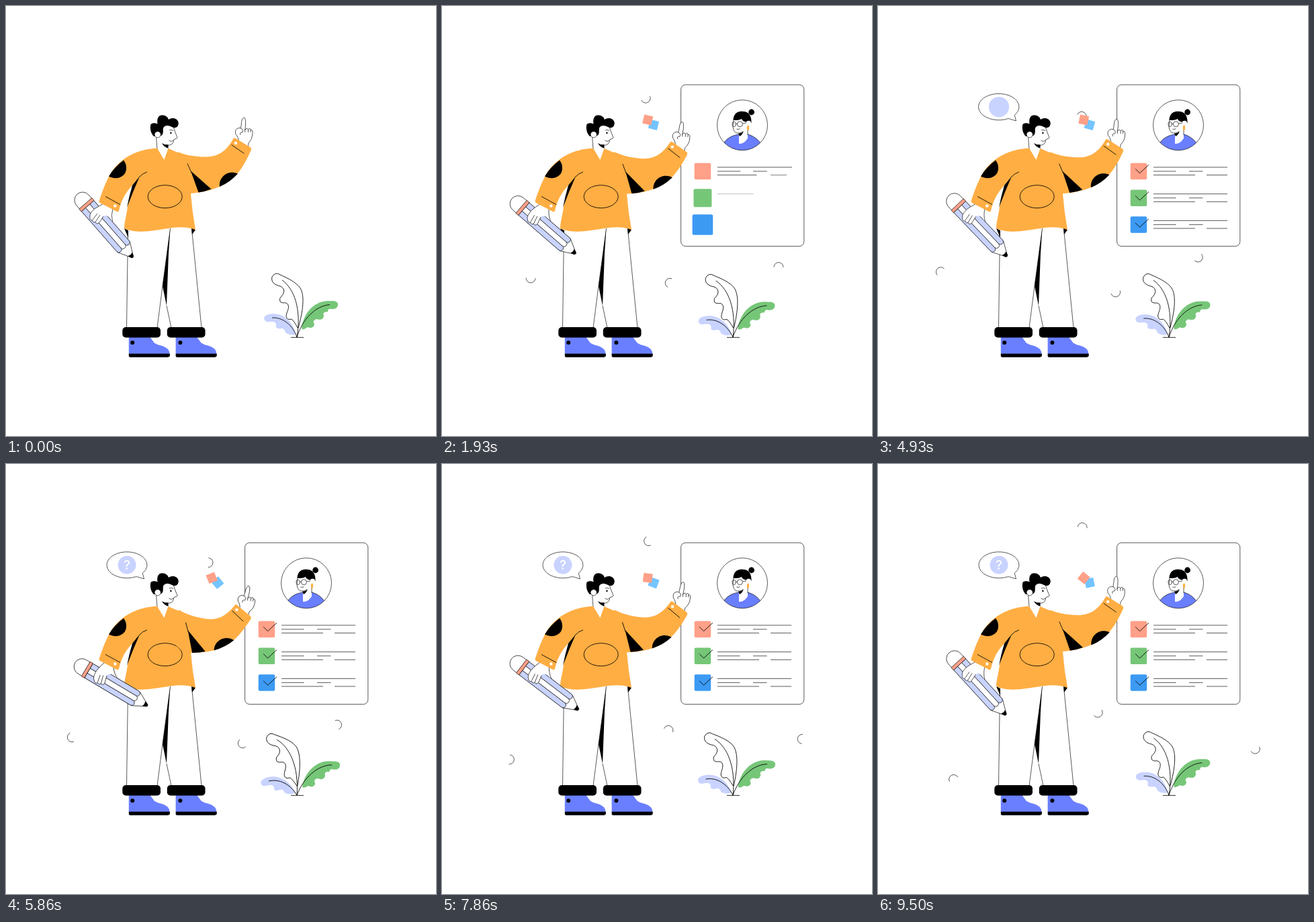
Recreate the animation shown at these times as an HTML page with a canvas. Size 640 by 640 pixels, loop 9.57 s.

```html
<!DOCTYPE html>
<html lang="en">
<head>
<meta charset="utf-8">
<title>Profile checklist</title>
<style>
  html, body { margin: 0; width: 100%; height: 100%; overflow: hidden; background: #fff; }
  canvas { display: block; width: 640px; height: 640px; }
</style>
</head>
<body>
<canvas id="stage" width="640" height="640"></canvas>
<script>
const ctx = document.getElementById('stage').getContext('2d');
const LOOP = 9570, HALF = LOOP / 2, STEP = LOOP / 134, SWAY = LOOP / 4;
const THIN = 0.65, BOLD = 0.85;
const INK = '#000', WHITE = '#fff', AMBER = '#ffae43', INDIGO = '#6a7fff', LILAC = '#c9d3ff',
  SALMON = '#ffa088', GREEN = '#76c678', BLUE = '#3d9af3', SKY = '#74c4ff';

const clamp = v => Math.max(0, Math.min(1, v));
const mix = (a, b, k) => a + (b - a) * k;
const rad = deg => deg * Math.PI / 180;

// Grows from 0 to 1 with an overshoot set by pull.
function pop(t, start, span, pull) {
  if (t <= start) return 0;
  const v = clamp((t - start) / span) - 1;
  return 1 + (pull + 1) * v ** 3 + pull * v * v;
}

// Linear interpolation through [time, value] keys.
function keyed(t, keys) {
  let i = 1;
  while (i < keys.length - 1 && t > keys[i][0]) i++;
  const [t0, a] = keys[i - 1], [t1, b] = keys[i];
  return mix(a, b, (t - t0) / (t1 - t0));
}

function paint(path, fill, stroke, width = THIN) {
  const p = typeof path === 'string' ? new Path2D(path) : path;
  if (fill) { ctx.fillStyle = fill; ctx.fill(p); }
  if (stroke) { ctx.strokeStyle = stroke; ctx.lineWidth = width; ctx.stroke(p); }
}
const fill = (path, color) => paint(path, color);
const line = (path, width) => paint(path, null, INK, width);

function oval(x, y, rx, ry, color, stroke, width) {
  const p = new Path2D();
  p.ellipse(x, y, rx, ry, 0, 0, Math.PI * 2);
  paint(p, color, stroke, width);
}
const disc = (x, y, r, color, stroke, width) => oval(x, y, r, r, color, stroke, width);

function box(x, y, w, h, r, color, stroke, width) {
  const p = new Path2D();
  p.roundRect(x, y, w, h, r);
  paint(p, color, stroke, width);
}

// Runs draw() rotated and scaled around a pivot.
function around(x, y, deg, scale, draw) {
  if (scale <= 0) return;
  ctx.save();
  ctx.translate(x, y);
  ctx.rotate(rad(deg));
  ctx.scale(scale, scale);
  ctx.translate(-x, -y);
  draw();
  ctx.restore();
}

// Drifting half rings: start, turning point and end of the path, first angle, spin direction.
const rings = [
  { path: [[304.5, 125], [304.5, 163.3], [304.5, 90]], angle: 102, spin: 1 },
  { path: [[154, 428], [90.4, 391], [111.3, 467.5]], bend: [114.8, 393.2], angle: 57, spin: -1 },
  { path: [[323, 397], [355.5, 431], [328.7, 372]], angle: -119, spin: 1 },
  { path: [[518, 392], [476, 375], [564.3, 428]], angle: 237, spin: -1 }
];

function drawRing(t, { path, bend, angle, spin }) {
  const at = axis => {
    const keys = [[0, path[0][axis]], [HALF, path[1][axis]], [LOOP, path[2][axis]]];
    if (bend) keys.splice(1, 0, [3430, bend[axis]]);
    return keyed(t, keys);
  };
  const gap = rad(angle + spin * 720 * t / LOOP);
  const x = at(0), y = at(1);
  around(x, y, 0, pop(t, 400, 600, 1), () => {
    const p = new Path2D();
    p.arc(x + 3.5 * Math.cos(gap), y + 3.5 * Math.sin(gap), 7, gap + Math.PI / 2, gap + Math.PI * 1.5);
    line(p);
  });
}

function drawTiles(t) {
  const size = pop(t, 400, 600, 1);
  const turn = keyed(t, [[0, -102], [1930, 14], [4930, 192], [6790, 304], [7860, 368], [LOOP, 495]]);
  around(315, 176.8, 28 - turn, size, () => fill('M308.3 170.1h13.4v13.4h-13.4z', SKY));
  around(306.2, 169.5, turn, size, () => fill('M299.5 162.8h13.4v13.4h-13.4z', SALMON));
}

function drawAvatar() {
  disc(447, 177.3, 37.5, WHITE);
  ctx.save();
  const frame = new Path2D();
  frame.arc(447, 177.3, 37.5, 0, Math.PI * 2);
  ctx.clip(frame);
  paint('M416 210C422 196 433 192 443 191L455 191C466 194 473 201 478 210L470 220H424Z', INDIGO, INK);
  fill('M442 187V205Q449 206 455 197V182Z', WHITE);
  ctx.restore();
  disc(447, 177.3, 37.5, null, INK);
  fill('M434 168L433 180Q434 187 438 189Q446 190 449 186L456 178V166Z', WHITE);
  line('M434 168L433 180Q434 187 438 189Q444 190 448 187M455 179V192');
  fill('M441 189.5Q446 190 449 186Q447 192 443 194Z', INK);
  disc(460.6, 158, 4.4, INK);
  fill('M433.5 169.5C434 159 442 156 448 157C457 157 461 164 460.5 174Q456 179 454 173Q447 172 446 168Q441 171 433.5 169.5Z', INK);
  disc(456.3, 174.5, 3.8, WHITE);
  oval(455.5, 181.3, 1.6, 3.9, AMBER);
  oval(434.6, 176, 2.7, 3.7, null, INK);
  disc(443.4, 175.8, 4, null, INK);
  line('M437.3 175.5H439.4M447.4 175L453 174M438.5 183Q441 184.5 443.5 182.5');
}

const segments = [[410, 520, 0], [410, 443.5, 6], [463, 483.5, 6], [410, 472, 11.6], [489, 520, 11.6]];

function drawRow(t, row, color) {
  const dy = row * 39.7;
  around(388, 246 + dy, 0, pop(t, 1180 + row * 200, 700, 3), () => box(375.7, 233.8 + dy, 24.5, 24.5, 2, color));
  segments.forEach(([x0, x1, drop], i) => {
    const start = 1140 + row * 650 + i * 130;
    const grow = pop(t, start, 900, 0.85);
    if (!grow) return;
    ctx.globalAlpha = clamp((t - start) / 350);
    const y = 240 + dy + drop;
    line(`M${x0} ${y}H${x0 + (x1 - x0) * grow}`);
    ctx.globalAlpha = 1;
  });
  const length = 28.2 * clamp((t - 2600 - row * 440) / 330);
  if (length) {
    const y = 242.3 + row * 40.2;
    ctx.setLineDash([length, 60]);
    line(`M383 ${y}L389.5 ${y + 6.5}L403 ${y - 6}`, BOLD);
    ctx.setLineDash([]);
  }
}

function drawCard(t) {
  around(447.2, 237.3, 0, pop(t, 250, 900, 1.45), () => box(355.6, 117.2, 183.2, 240.4, 7, WHITE, INK));
  around(447, 177.3, 0, pop(t, 700, 700, 1.5), drawAvatar);
  [SALMON, GREEN, BLUE].forEach((color, row) => drawRow(t, row, color));
}

function drawBubble(t) {
  around(205.5, 171, 0, pop(t, 4265, 700, 3), () => {
    const p = new Path2D();
    p.ellipse(180, 150.3, 30, 19.5, 0, rad(62), rad(399));
    p.lineTo(205.5, 171);
    p.closePath();
    paint(p, WHITE, INK);
  });
  around(180, 150.3, 0, pop(t, 4400, 700, 3), () => disc(180, 150.3, 13.5, LILAC));
  around(180, 150.3, 0, pop(t, 4920, 700, 3), () => {
    ctx.fillStyle = WHITE;
    ctx.font = '500 19px Inter, sans-serif';
    ctx.textAlign = 'center';
    ctx.fillText('?', 180, 157.3);
  });
}

function drawPlant(sway) {
  const leaf = (deg, draw) => around(433, 493, deg * sway, 1, draw);
  leaf(-13, () => {
    fill('M431 489C429 473 415 458 398 458Q386 458 384 464Q384 471 393 470Q402 469 402 475Q400 481 409 480Q415 479 416 486Q423 491 431 489Z', LILAC);
    line('M396 464C412 463 427 475 433 493', BOLD);
  });
  leaf(4.3, () => {
    fill('M440 480C442 459 457 440 478 439L488 439Q495 440 494 446Q492 452 484 451Q479 450 479 455Q470 455 473 461Q472 469 462 466Q455 468 459 474Q457 481 449 478Q442 483 440 480Z', GREEN);
    line('M482 444.5C461 446 441 466 433 493', BOLD);
  });
  leaf(-5.9, () => {
    paint('M434 479Q429 469 425 466Q418 468 417 462C417 456 422 451 420 445C417 439 412 444 408 440Q406 435 410 432C416 426 414 419 408 417C400 415 394 411 396 403Q401 395 408 400C419 405 432 411 438 420C445 431 442 455 435 479Z', WHITE, INK, BOLD);
    line('M411 408C429 421 440 451 433 493', BOLD);
  });
  line('M424 493.3H443', BOLD);
}

function drawShoe(x) {
  ctx.save();
  ctx.translate(x, 0);
  fill('M0 492H31L38 501.5Q43 505 50 506Q60 509 61 518H0Z', INDIGO);
  fill('M0 517.5H61Q62 522.7 58 522.7H2Q0 522.7 0 521Z', INK);
  ctx.restore();
}

function drawLegs() {
  fill('M182 332L179.5 479H225L239 440L246 479H291L277 332Z', WHITE);
  line('M181.5 335L179.5 479M276.5 332L291 479M233 417L225 479M239 446L246 479M244.5 331L233 417');
  fill('M244.5 331L233 417L239 446L242 368Z', INK);
  fill('M176 331L182 334V345Z', INK);
  fill('M276 330L282 333L277 340Z', INK);
  drawShoe(182.8);
  drawShoe(252.6);
  disc(188.2, 501, 3, INK);
  disc(259.4, 501, 3, INK);
  box(173.3, 478, 56.7, 15.5, 5, INK);
  box(239.8, 478, 56.7, 15.5, 5, INK);
}

function drawHead() {
  fill('M223.5 190L225 213L235 229L241 212V206L246 207Q250 204 250 198Q255 197 255 196L251 187L250 180L236 176Z', WHITE);
  line('M223.5 194L225 213M241 206V212M238 207Q249 209 250 198.5Q255 197.5 255 195.8L251.5 187L249.5 181');
  fill('M232 204Q236 207 241.3 206.5V211.5Q235 210 232 204Z', INK);
  fill('M220 194C215 189 214 181 215.5 176Q219 173 225.5 175.5C224 166 228 162 233 162.5Q240 163 242 169C247 165 256 167 256.7 174C257 180 252 183 247 180Q239 176 235 180C232 184 236 190 231 193Z', INK);
  disc(225.7, 191.3, 4.6, WHITE, INK);
  oval(245.4, 189, 1.1, 1.4, INK);
  line('M243 185Q246 183.5 249 185.5M242.5 200Q246 203 249 200');
}

function drawTorso() {
  fill('M221 212L225 212L235.3 229L241.5 212Q252 217 262 220L272 238L275 279Q277 306 282 333C268 328 254 329 242 331C220 334 196 340 176 331C176 320 180 311 181 298L190 264Z', AMBER);
  oval(236.7, 283.7, 25.5, 17, null, INK, BOLD);
}

function drawPencil() {
  ctx.save();
  ctx.translate(114, 289);
  ctx.rotate(rad(48.7));
  paint('M0 -12A12 12 0 0 0 0 12H93L113.5 1V-1L93 -12Z', WHITE, INK);
  const bands = [[-12.2, LILAC], [4, LILAC], [-4.1, WHITE]];
  for (const [y, color] of bands) box(11.5, y, 83.5, 8.2, [0, 4, 4, 0], color, INK);
  box(6.5, -12.6, 5, 25.2, 0.5, SALMON, INK);
  fill('M107 -4L112 -2.5Q115 0 112 2.5L107 4Q109 0 107 -4Z', INK);
  ctx.restore();
  fill('M148 292Q139 297 133 301C128 305 124 310 125 314Q124 319 129 319Q129 323 133 321.5Q135 326 139 322L145 313Q152 309 158 321Q156 312 159 301Z', WHITE);
  line('M148 293Q139 297 133 301C128 305 124 310 125 314Q124 319 129 319Q129 323 133 321.5Q135 326 139 322L145 313M129 318L136 309M133 321.5L140 311M159 301Q156 312 158.5 321');
}

function drawLeftSleeve() {
  fill('M225 211.7C196 213 172 225 157 247C148 262 143 277 139 289Q138 292 140 293L165 306Q167 307 168 305C171 291 177 278 189 266L200 254L235 250V229Z', AMBER);
  fill('M199 253.5L188 267Q183 284 180 300Q189 276 199 253.5Z', INK);
  line('M210 247Q203 249 198 255M148 283.5L170 295.5', BOLD);
  fill('M175 229.5Q161 240 153 253.5C165 260 178 254 179 243Q179.5 235 175 229.5Z', INK);
  disc(162.4, 297.5, 2.2, WHITE);
}

function drawRightArm() {
  paint('M347 204Q346 195 342 191Q340 185 344 182.5Q347 180.5 349.5 182L351 170Q353 165 355 166.5Q357 168 356.5 178L355.5 185Q358 180 360.5 184Q363 180 364 184.5Q367.5 183 367 190Q367 198 361 204L360 212Z', WHITE, INK);
  line('M349 192Q347 188 352 188Q354 184 349.5 182M355.5 185L356 188M360.5 184V188M364 184.5V188');
  fill('M257 217.5C270 223 285 224.5 299 224.5C318 224 329 214 338 198Q339 195.5 341 196.5L364 210.5Q365.5 211.5 365 214C358 230 351 242 344 250C331 265 309 276 275 279L260 270Z', AMBER);
  fill('M275 245.5L286.5 277.5Q297 276 305.5 272.5Z', INK);
  fill('M318 269C316 256 329 243 345 249.5Q334 262 318 269Z', INK);
  line('M270 234.5L276 248M335.5 206.5L354.5 219.5', BOLD);
  disc(342, 204, 2.2, WHITE);
}

function render(now) {
  const t = Math.floor((now % LOOP) / STEP + 0.001) * STEP;
  const sway = 1 - Math.abs(1 - 2 * (t % SWAY) / SWAY);
  ctx.fillStyle = WHITE;
  ctx.fillRect(0, 0, 640, 640);
  ctx.lineJoin = 'round';
  rings.forEach(ring => drawRing(t, ring));
  drawTiles(t);
  drawCard(t);
  drawPlant(sway);
  drawBubble(t);
  drawLegs();
  drawHead();
  drawTorso();
  around(154, 298, -20 * sway, 1, drawPencil);
  drawLeftSleeve();
  around(260, 219, 10 * sway, 1, drawRightArm);
}

let origin = null;
function tick(now) {
  if (origin === null) origin = now;
  render(Math.max(0, now - origin));
  requestAnimationFrame(tick);
}
render(0);
requestAnimationFrame(tick);
</script>
</body>
</html>
```
